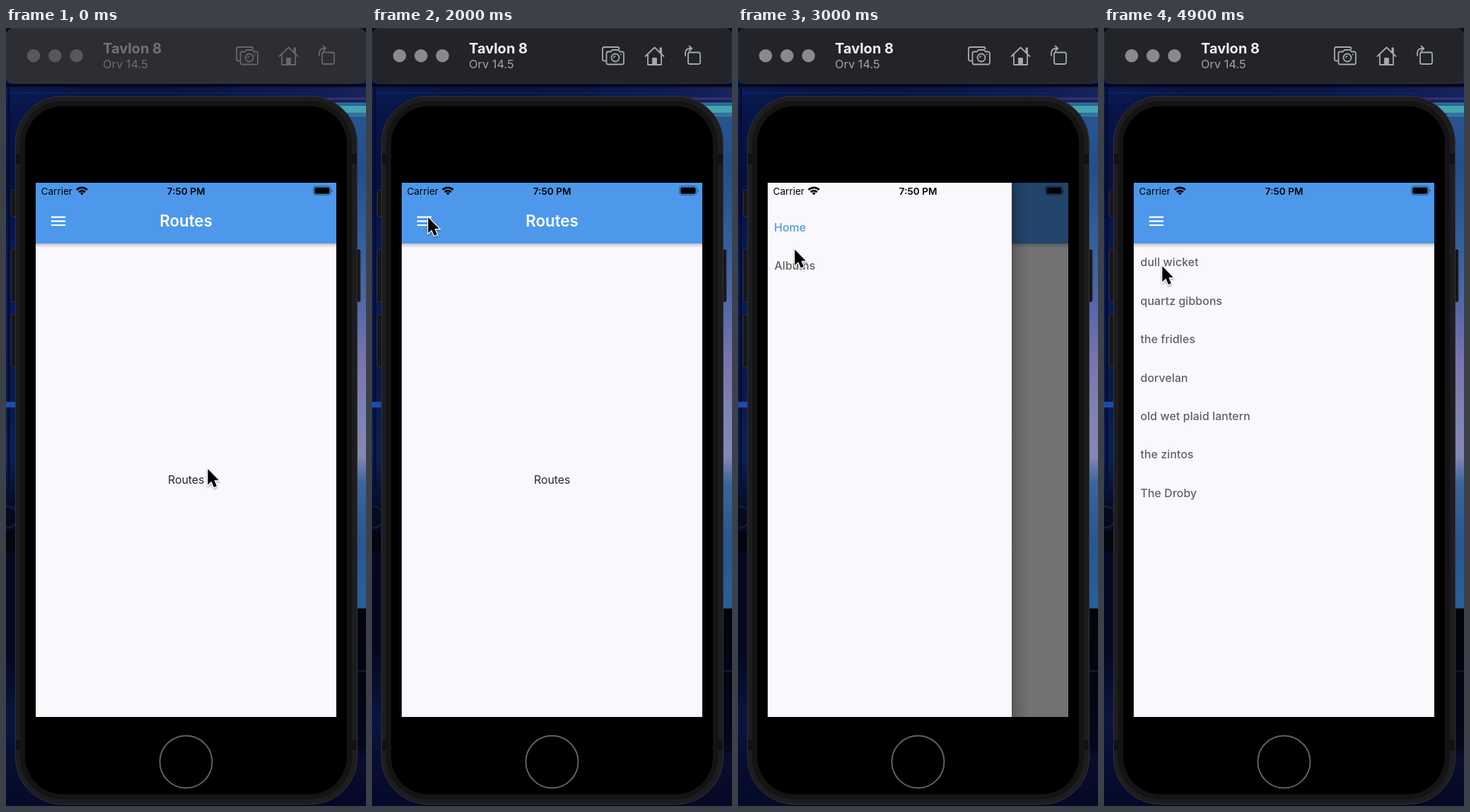
An HTML page for the animation above (5000 ms loop, 509x1101 px).

```html
<!DOCTYPE html>
<html lang="en">
<head>
<meta charset="utf-8">
<title>Drawer navigation demo</title>
<style>
  html, body { margin: 0; height: 100%; overflow: hidden; background: #050a24; }
  svg { display: block; width: 100vw; height: 100vh; font-family: Inter, sans-serif; }
  .entry { font-size: 15.87px; font-weight: 500; fill: #606063; letter-spacing: .1px; }
  .line { fill: none; stroke: currentColor; stroke-width: 1.8; stroke-linejoin: round; stroke-linecap: round; }
  #toolbar { color: #66676a; --bar: #2c2e33; --dot: #56585d; --title: #717276; --sub: #6b6c70; }
  #toolbar.active { color: #a8a9ab; --bar: #22242a; --dot: #898a8e; --title: #f0f0f1; --sub: #a3a4a8; }
</style>
</head>
<body>
<svg viewBox="0 0 509 1101">
  <defs>
    <linearGradient id="leftWall" x2="0" y2="1">
      <stop stop-color="#050b24"/><stop offset=".09" stop-color="#08164a"/>
      <stop offset=".2" stop-color="#061040"/><stop offset=".32" stop-color="#081c5c"/>
      <stop offset=".46" stop-color="#08194c"/><stop offset=".55" stop-color="#0a2058"/>
      <stop offset=".62" stop-color="#040a22"/><stop offset=".8" stop-color="#040820"/>
      <stop offset=".89" stop-color="#0a1540"/><stop offset=".93" stop-color="#070f34"/>
      <stop offset="1" stop-color="#050a28"/>
    </linearGradient>
    <linearGradient id="rightWall" x2="0" y2="1">
      <stop offset=".1" stop-color="#2a5692"/><stop offset=".18" stop-color="#224f8c"/>
      <stop offset=".28" stop-color="#35609e"/><stop offset=".36" stop-color="#5668a8"/>
      <stop offset=".43" stop-color="#7b75ae"/><stop offset=".5" stop-color="#7f83b4"/>
      <stop offset=".55" stop-color="#8688b4"/><stop offset=".585" stop-color="#3c659c"/>
      <stop offset=".66" stop-color="#28568e"/><stop offset=".745" stop-color="#28609c"/>
      <stop offset=".747" stop-color="#02030a"/><stop offset=".92" stop-color="#04061a"/>
      <stop offset=".94" stop-color="#090e30"/><stop offset="1" stop-color="#050824"/>
    </linearGradient>
    <linearGradient id="topWall">
      <stop stop-color="#0a1a52"/><stop offset=".3" stop-color="#07133c"/>
      <stop offset=".6" stop-color="#081746"/><stop offset=".85" stop-color="#0f1c52"/>
      <stop offset="1" stop-color="#18245a"/>
    </linearGradient>
    <linearGradient id="barShadow" x2="0" y2="1">
      <stop stop-color="#000" stop-opacity=".22"/><stop offset="1" stop-color="#000" stop-opacity="0"/>
    </linearGradient>
    <linearGradient id="drawerShadow">
      <stop stop-color="#000" stop-opacity=".22"/><stop offset=".4" stop-color="#000" stop-opacity=".1"/>
      <stop offset="1" stop-color="#000" stop-opacity="0"/>
    </linearGradient>
    <clipPath id="screen"><rect x="42" y="219" width="425" height="756"/></clipPath>
    <filter id="soft" x="-50%" y="-50%" width="200%" height="200%">
      <feDropShadow dx="0" dy="1.5" stdDeviation="1.3" flood-opacity=".4"/>
    </filter>
    <g id="appBar">
      <rect x="42" y="219" width="425" height="756" fill="#faf8fc"/>
      <rect x="42" y="305" width="425" height="6" fill="url(#barShadow)"/>
      <rect x="42" y="219" width="425" height="86" fill="#4d98ea"/>
      <path d="M63.8 267.6h20.4m-20.4 5.7h20.4m-20.4 5.7h20.4" stroke="#fff" stroke-width="2.2"/>
    </g>
  </defs>

  <!-- desktop -->
  <rect width="260" height="1101" fill="url(#leftWall)"/>
  <rect x="260" width="249" height="1101" fill="url(#rightWall)"/>
  <rect y="70" width="509" height="36" fill="url(#topWall)"/>
  <rect width="509" height="70" fill="#0a0d18"/>
  <path d="M0 81H509" stroke="#040819" stroke-width="5"/>
  <path d="M0 92H440" stroke="#0f256a" stroke-width="1.5"/>
  <path d="M430 100H509" stroke="#3d2f74" stroke-width="3"/>
  <path d="M440 107H509" stroke="#287498" stroke-width="3"/>
  <path d="M470 115H509" stroke="#43a5b2" stroke-width="10"/>
  <path d="M485 123H509" stroke="#34749e" stroke-width="5"/>
  <path d="M4 84V650" stroke="#050c30" stroke-width="3"/>
  <path d="M0 533H13" stroke="#1b4cab" stroke-width="8"/>
  <circle cx="2" cy="692" r="15" fill="#050a1c" stroke="#0e1b3a" stroke-width="3"/>
  <path d="M0 712H13V742H0Z" fill="#03060f"/>
  <path d="M497 910H509" stroke="#1c123c" stroke-width="2"/>

  <!-- simulator toolbar -->
  <g id="toolbar">
    <rect x=".5" y=".5" width="508" height="78" rx="10" fill="var(--bar)" stroke="#46484e" stroke-opacity=".55"/>
    <g fill="var(--dot)">
      <circle cx="39" cy="39.3" r="9.2"/><circle cx="69.3" cy="39.3" r="9.2"/><circle cx="99.6" cy="39.3" r="9.2"/>
    </g>
    <text x="137" y="36" font-size="20" font-weight="700" fill="var(--title)">Tavlon 8</text>
    <text x="137" y="57" font-size="16.4" fill="var(--sub)">Orv 14.5</text>
    <g class="line">
      <path d="M330 46.5h-1.5a2.5 2.5 0 0 1-2.5-2.5V29.5a2.5 2.5 0 0 1 2.5-2.5H347a2.5 2.5 0 0 1 2.5 2.5"/>
      <path d="M334 33.5h4l2-2.5h8l2 2.5h3.5a2.5 2.5 0 0 1 2.5 2.5v13a2.5 2.5 0 0 1-2.5 2.5H334a2.5 2.5 0 0 1-2.5-2.5V36a2.5 2.5 0 0 1 2.5-2.5z"/>
      <circle cx="344" cy="42" r="5.5"/>
      <path d="M341.8 42a2.2 2.2 0 0 1 2.2-2.2" stroke-width="1.3"/>
      <path d="M351.8 37.4h.2"/>
      <path d="M386.5 40 399.5 27.5 412.5 40M390 37.5V52h19V37.5M407.5 34V28.5h1.5V35.5"/>
      <path d="M397 43h5v8h-5z" fill="currentColor"/>
      <rect x="447" y="34.5" width="17" height="16.5" rx="2.5"/>
      <path d="M443 39v-4a6 6 0 0 1 6-6h3M448.5 25.5l3.8 3.5-3.8 3.5"/>
    </g>
  </g>

  <!-- phone -->
  <g fill="#151517" stroke="#323235">
    <rect x="7.5" y="229.5" width="10" height="37" rx="2"/>
    <rect x="7.5" y="313.5" width="10" height="74" rx="2"/>
    <rect x="7.5" y="405.5" width="10" height="74" rx="2"/>
    <rect x="490" y="313.5" width="11" height="74" rx="2"/>
    <rect x="13.5" y="96.5" width="483" height="1002" rx="66" fill="#1d1d1f"/>
  </g>
  <path d="M14 185h12M484 185h12M14 1015h12M484 1015h12" stroke="#121213" stroke-width="14"/>
  <rect x="23.5" y="107" width="462" height="981" rx="56" fill="none" stroke="#141415" stroke-width="7"/>
  <rect x="27" y="110.5" width="455" height="974" rx="53"/>
  <circle cx="254.5" cy="1038.5" r="37" fill="none" stroke="#606163" stroke-width="2"/>

  <g clip-path="url(#screen)">
    <g id="homePage">
      <use href="#appBar"/>
      <text x="254.5" y="281" font-size="22.3" font-weight="600" fill="#fff" text-anchor="middle">Routes</text>
      <text x="254.7" y="645.3" font-size="15.87" fill="#28282a" text-anchor="middle">Routes</text>
      <rect id="scrim" x="42" y="219" width="425" height="756"/>
      <g id="drawer">
        <rect x="387" y="219" width="26" height="756" fill="url(#drawerShadow)"/>
        <rect x="42" y="219" width="345" height="756" fill="#faf8fc"/>
        <rect id="highlight" x="42" y="316" width="93.5" height="41" rx="5" fill="#f4f8fa"/>
        <text class="entry" x="51" y="288" style="fill:#4f9adf">Home</text>
        <text class="entry" x="51.5" y="342.2">Albums</text>
      </g>
    </g>
    <g id="albumsPage"><use href="#appBar"/></g>

    <!-- status bar -->
    <text x="49.5" y="235.5" font-size="13.6">Carrier</text>
    <text x="254.7" y="235.5" font-size="13.6" font-weight="600" text-anchor="middle">7:50 PM</text>
    <g fill="none" stroke="#000" stroke-width="2.7">
      <path d="M99.8 229a10.4 10.4 0 0 1 15 0M102.8 232.2a6.2 6.2 0 0 1 9 0"/>
      <path d="M104.8 233.8a3.6 3.6 0 0 1 5 0L107.3 236.6z" fill="#000" stroke="none"/>
    </g>
    <rect x="434.5" y="223.8" width="24.8" height="12.6" rx="3.6" fill="none" stroke="#000" stroke-opacity=".45"/>
    <rect x="436.2" y="225.5" width="21.4" height="9.2" rx="2.2"/>
    <path d="M460.4 228.2a2.2 2.2 0 0 1 0 4z" opacity=".45"/>
  </g>

  <path id="cursor" d="M1.4 2V24.2L6.4 19.6 10 28 14 26.3 10.4 18.1H16.9Z" stroke="#fff" stroke-width="2.4" paint-order="stroke" filter="url(#soft)"/>
</svg>

<script>
const LOOP = 5000, STEP = 100;
const SCREEN_WIDTH = 425, DRAWER_WIDTH = 345;
const ALBUMS = ["dull wicket", "quartz gibbons", "the fridles", "dorvelan",
  "old wet plaid lantern", "the zintos", "The Droby"];
// time, x, y
const CURSOR_PATH = [[200, 284, 622], [1300, 93, 284], [1700, 78, 266], [2650, 78, 266],
  [3100, 79, 318], [3600, 80, 332], [4000, 81, 335]];

const $ = id => document.getElementById(id);
const progress = (t, start, length) => Math.min(1, Math.max(0, (t - start) / length));
const easeOut = (u, power) => 1 - (1 - u) ** power;
const smooth = u => u * u * (3 - 2 * u);
const move = (id, x, y = 0) => $(id).setAttribute("transform", `translate(${x} ${y})`);

ALBUMS.forEach((name, i) => {
  const label = document.createElementNS("http://www.w3.org/2000/svg", "text");
  label.setAttribute("class", "entry");
  label.setAttribute("x", 51.5);
  label.setAttribute("y", 337.4 + 54.4 * i);
  label.textContent = name;
  $("albumsPage").append(label);
});

function cursorAt(t) {
  let [, x, y] = CURSOR_PATH[0];
  for (let i = 1; i < CURSOR_PATH.length; i++) {
    const [start, x0, y0] = CURSOR_PATH[i - 1], [end, x1, y1] = CURSOR_PATH[i];
    if (t < start) break;
    const u = smooth(progress(t, start, end - start));
    x = x0 + (x1 - x0) * u;
    y = y0 + (y1 - y0) * u;
  }
  return [x, y];
}

function draw(t) {
  $("toolbar").classList.toggle("active", t >= 2000);

  const open = easeOut(progress(t, 2350, 226), 3);
  move("drawer", -DRAWER_WIDTH * (1 - open));
  $("drawer").style.visibility = open ? "visible" : "hidden";
  $("scrim").style.opacity = .54 * open;
  $("highlight").style.opacity = progress(t, 4200, 200);

  const push = easeOut(progress(t, 4500, 400), 4);
  move("homePage", -SCREEN_WIDTH / 3 * push);
  move("albumsPage", SCREEN_WIDTH * (1 - push));

  move("cursor", ...cursorAt(t));
}

function tick() {
  const t = performance.now() % LOOP;
  draw(Math.floor(t / STEP) * STEP);
  requestAnimationFrame(tick);
}
tick();
</script>
</body>
</html>
```
